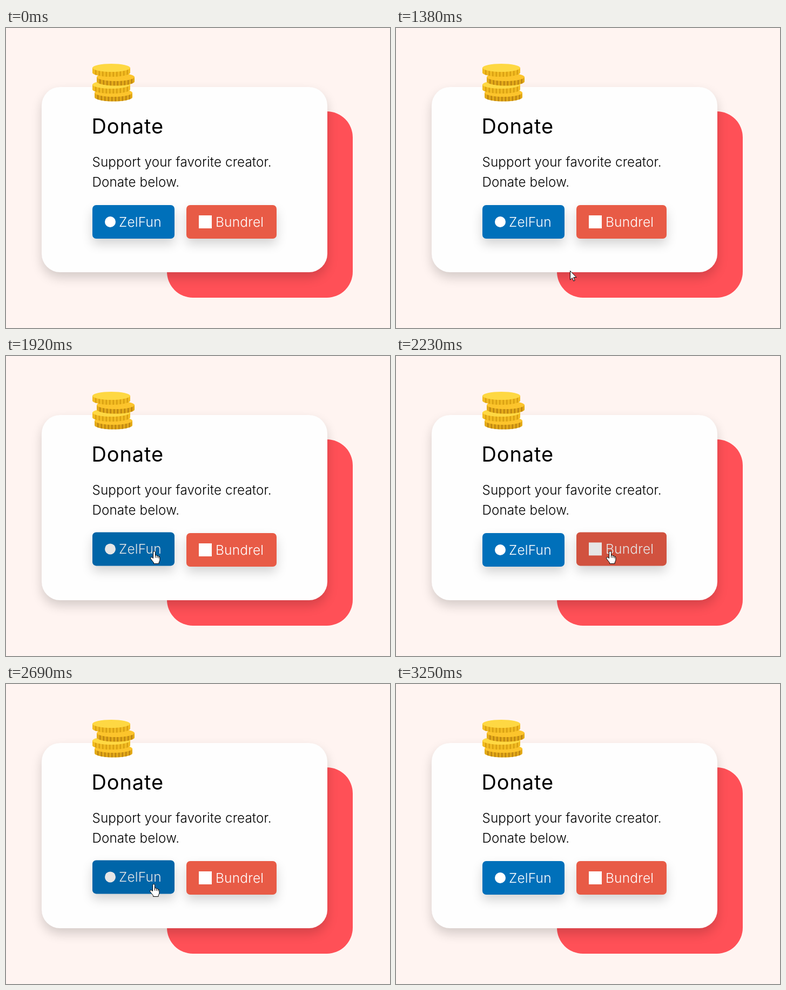
Write an HTML page with a canvas that moves like this. It is 711x554 px and loops after 3890 ms.

```html
<!DOCTYPE html>
<html lang="en">
<head>
<meta charset="utf-8">
<title>Donate card</title>
<style>
  html, body { margin: 0; width: 100%; height: 100%; overflow: hidden; background: #fff4f1; }
  canvas { display: block; }
</style>
</head>
<body>
<canvas id="stage" width="711" height="554"></canvas>
<script>
const ctx = document.getElementById('stage').getContext('2d');
const LOOP = 3890;
const SHOW = 990, HIDE = 3245, STEP = 77;
const FADE = 150, SAMPLES = 30, LIFT = 1.6;
const FONT = 'Inter, Lato, sans-serif';

// Turning points of the pointer
const path = [
  { t: 1100, x: 407, y: 541 },
  { t: 1606, x: 256, y: 377 },
  { t: 1914, x: 275, y: 361 },
  { t: 2222, x: 397, y: 361 },
  { t: 2325, x: 397, y: 361 },
  { t: 2675, x: 274, y: 370 },
  { t: 2840, x: 285, y: 394 },
  { t: 3145, x: 584, y: 534 }
];

const buttons = [
  { x: 160, y: 327, w: 152, h: 62, rgb: [0, 112, 186],
    label: 'ZelFun', textX: 209, icon: { x: 183, y: 348, size: 20, r: 10 } },
  { x: 334, y: 327, w: 167, h: 62, rgb: [232, 91, 70],
    label: 'Bundrel', textX: 388, icon: { x: 357, y: 346, size: 24, r: 0 } }
];

const handPath = new Path2D(
  'M-2 13V2Q-2 0 0 0Q2 0 2 2V7.5Q4.6 6.5 5.3 8.6Q7.4 7.6 8.2 9.8' +
  'Q10.4 9.4 10.4 12V16Q10.4 18.5 8.6 20.5V23H-1V21Q-2.5 19.5 -6.6 14' +
  'Q-7.6 11.5 -5.5 11Q-4 11 -2 13Z');
const knuckles = new Path2D('M2 7.5V12M5.2 8.6V12.4M8.2 9.8V13');
const arrowPath = new Path2D('M0 0V16.5L3.8 12.9L6.3 18.7L8.7 17.7L6.2 12H11.5Z');

function smooth(v) {
  const u = Math.min(1, Math.max(0, v));
  return u * u * (3 - 2 * u);
}

function pointerAt(t) {
  const next = path.findIndex(p => p.t > t);
  if (next === 0) return path[0];
  if (next < 0) return path.at(-1);
  const a = path[next - 1], b = path[next];
  const k = smooth((t - a.t) / (b.t - a.t));
  return { x: a.x + (b.x - a.x) * k, y: a.y + (b.y - a.y) * k };
}

function inside(b, p) {
  return p.x >= b.x && p.x <= b.x + b.w && p.y >= b.y && p.y <= b.y + b.h;
}

// Share of the last FADE ms that the pointer spent on the button, eased
function hoverAmount(b, t) {
  let hits = 0;
  for (let i = 0; i < SAMPLES; i++) {
    if (inside(b, pointerAt(t - FADE * i / SAMPLES))) hits++;
  }
  return smooth(hits / SAMPLES);
}

function roundRect(x, y, w, h, r, fill) {
  ctx.beginPath();
  ctx.roundRect(x, y, w, h, r);
  ctx.fillStyle = fill;
  ctx.fill();
}

function raisedRect(...rect) {
  ctx.save();
  ctx.shadowColor = 'rgba(0,0,0,.17)';
  ctx.shadowBlur = 20;
  ctx.shadowOffsetY = 10;
  roundRect(...rect);
  ctx.restore();
}

function text(str, x, y, size, weight, fill, spacing = 0) {
  ctx.font = `${weight} ${size}px ${FONT}`;
  ctx.letterSpacing = spacing + 'px';
  ctx.fillStyle = fill;
  ctx.fillText(str, x, y);
}

function coin(cx, cy, depth, top, side, stripe) {
  const rx = 35, ry = 7.5;
  ctx.save();
  ctx.beginPath();
  ctx.moveTo(cx - rx, cy);
  ctx.lineTo(cx - rx, cy + depth);
  ctx.ellipse(cx, cy + depth, rx, ry, 0, Math.PI, 0, true);
  ctx.lineTo(cx + rx, cy);
  ctx.closePath();
  ctx.fillStyle = side;
  ctx.fill();
  ctx.clip();
  ctx.fillStyle = stripe;
  for (let x = cx - rx + 5; x < cx + rx; x += 6.5) ctx.fillRect(x, cy, 2.5, depth + ry);
  ctx.restore();
  ctx.beginPath();
  ctx.ellipse(cx, cy, rx, ry, 0, 0, 2 * Math.PI);
  ctx.fillStyle = top;
  ctx.fill();
}

const lightCoin = (x, y) => coin(x, y, 9, '#fed843', '#f2bc22', '#d99f12');
const darkCoin = (x, y) => coin(x, y, 8.5, '#fcc42c', '#e3aa18', '#bd8412');

function drawButton(b, t) {
  const hover = hoverAmount(b, t);
  const shade = rgb => `rgb(${rgb.map(c => Math.round(c * (1 - 0.1 * hover)))})`;
  const white = shade([255, 255, 255]);
  const { x, y, size, r } = b.icon;
  ctx.save();
  ctx.translate(0, -LIFT * hover);
  raisedRect(b.x, b.y, b.w, b.h, 7, shade(b.rgb));
  roundRect(x, y, size, size, r, white);
  text(b.label, b.textX, 367, 24.5, 300, white, 0.2);
  ctx.restore();
}

function drawPointer(p) {
  const isHand = buttons.some(b => inside(b, p));
  const shape = isHand ? handPath : arrowPath;
  const nudge = isHand ? -0.5 : 0.5;
  ctx.save();
  ctx.translate(Math.round(p.x) + nudge, Math.round(p.y) + nudge);
  ctx.fillStyle = '#fff';
  ctx.strokeStyle = '#000';
  ctx.lineWidth = 1;
  ctx.fill(shape);
  ctx.stroke(shape);
  if (isHand) ctx.stroke(knuckles);
  ctx.restore();
}

function drawScene(t) {
  ctx.fillStyle = '#fff4f1';
  ctx.fillRect(0, 0, 711, 554);
  roundRect(298, 154, 344, 344, 48, '#ff5057');
  raisedRect(66, 109, 529, 342, 34, '#fefefe');

  darkCoin(199, 119.5);
  lightCoin(195, 104.5);
  darkCoin(203, 90.5);
  lightCoin(195, 73.5);

  text('Donate', 158.5, 195, 38, 400, '#000', 0.9);
  text('Support your favorite creator.', 159.5, 256, 24.2, 300, '#000', 0.13);
  text('Donate below.', 159.5, 293, 24.2, 300, '#000', 0.13);

  buttons.forEach(b => drawButton(b, t));
  if (t >= SHOW && t < HIDE) drawPointer(pointerAt(t));
}

let start;
function tick(now) {
  start ??= now;
  const t = (now - start) % LOOP;
  const held = SHOW + Math.floor((t - SHOW) / STEP) * STEP;
  drawScene(t < HIDE ? held : t);
  requestAnimationFrame(tick);
}
requestAnimationFrame(tick);
</script>
</body>
</html>
```
